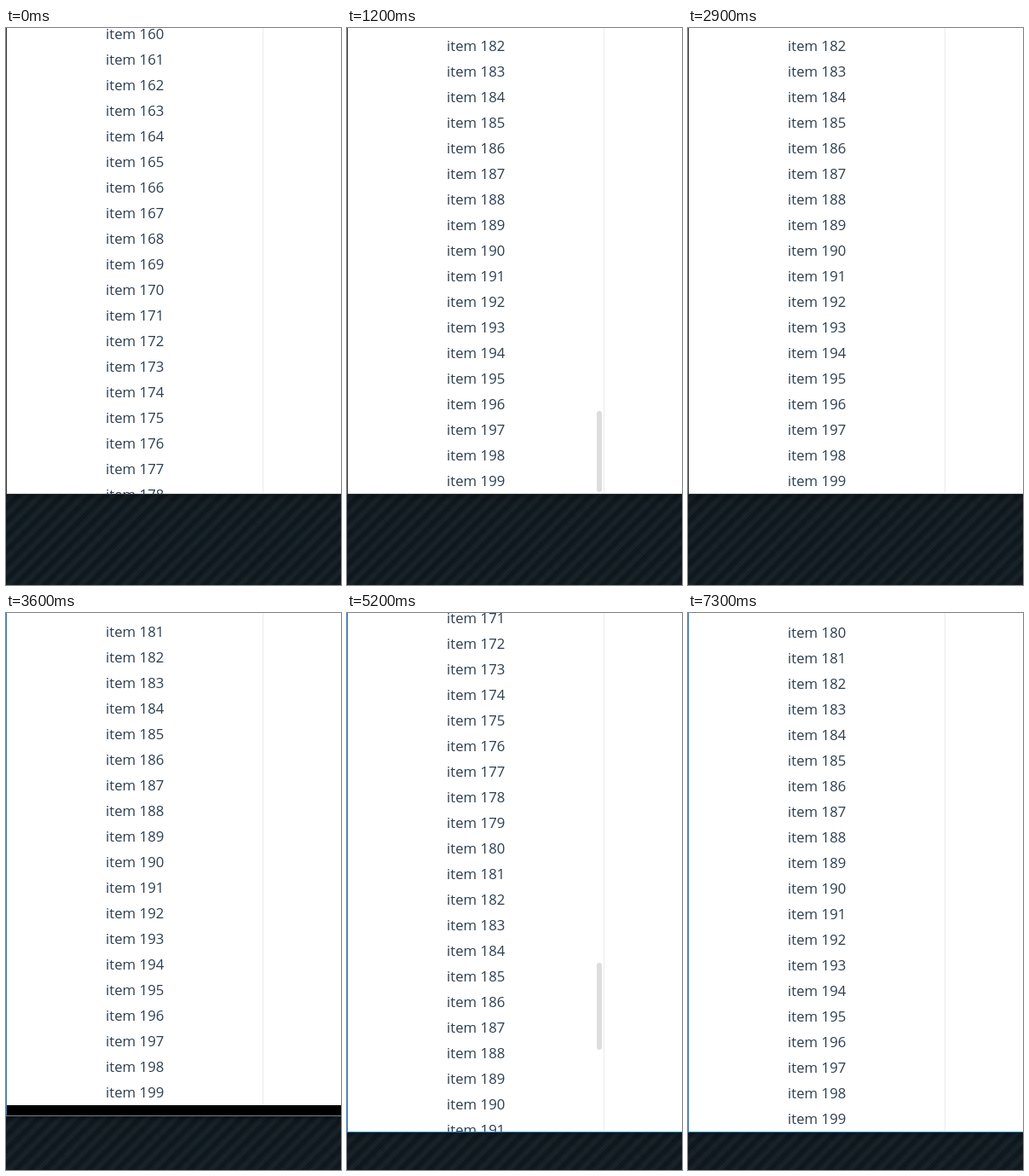
An HTML page for the animation above (8 s loop, 393x653 px).

```html
<!DOCTYPE html>
<html lang="en">
<head>
<meta charset="utf-8">
<title>Scrolling list</title>
<style>
html, body { margin: 0; width: 100%; height: 100%; overflow: hidden; }
body {
  position: relative;
  background:
    repeating-linear-gradient(45deg, #0002 0 1px, #0000 1px 3px),
    repeating-linear-gradient(135deg, #10191f 0 3px, #19242b 7px 9px, #10191f 12px);
}
div { position: absolute; box-sizing: border-box; }
#win {
  left: 0; top: 0; width: 393px;
  border: solid; border-width: 0 0 1px 1px;
  background: #000; box-shadow: 0 2px 8px #0006;
}
#page { left: 0; top: 0; width: 392px; overflow: hidden; background: #fff; }
#rule { left: 300px; top: 0; width: 1px; height: 100%; background: #ebebeb; }
#list {
  left: 116px; bottom: 0; white-space: pre;
  font: 16.8px/30px "Open Sans", "Noto Sans", sans-serif; color: #2c3e50;
}
#thumb { left: 292px; width: 6px; border-radius: 3px; }
</style>
</head>
<body>
<div id="win">
  <div id="page">
    <div id="list"></div>
    <div id="rule"></div>
    <div id="thumb"></div>
  </div>
</div>
<script>
const [win, page, list, thumb] =
  ["win", "page", "list", "thumb"].map(id => document.getElementById(id));
const LOOP = 8000, STEP = 100, HEIGHT = 546, GROWTH = 62;

list.textContent = Array.from({ length: 60 }, (_, i) => "item " + (140 + i)).join("\n");

const ramp = (t, a, b) => Math.min(1, Math.max(0, (t - a) / (b - a)));
const ease = (t, a, b) => { const u = ramp(t, a, b); return u * u * (3 - 2 * u); };
const hump = (t, a, peak, b) => ease(t, a, peak) - ease(t, peak, b);
const grow = t => Math.round(GROWTH * (1 - (1 - ramp(t, 3300, 3900)) ** 1.7));
const within = (t, a, b) => t >= a && t < b;

function thumbColor(t) {
  if (within(t, 400, 2900) || within(t, 5000, 6500)) return "#ddd";
  if (within(t, 4400, 5000) || within(t, 7200, 7300)) return "#e8e8e8";
  return "transparent";
}

function draw(now) {
  const t = Math.floor(now % LOOP / STEP) * STEP;

  // Distance of the view from the end of the list
  const scroll = Math.round(646 * (1 - ease(t, 600, 1200))
    + 400 * hump(t, 1600, 2000, 2300)
    + 300 * hump(t, 4900, 5300, 5600));

  // The page repaints one step behind the window edge
  const outer = grow(t), inner = grow(t - STEP);
  win.style.height = HEIGHT + outer + 1 + "px";
  page.style.height = HEIGHT + inner + "px";
  const edge = t < 3200 ? "#333" : "#1883d7";
  win.style.borderLeftColor = edge;
  win.style.borderBottomColor = outer > inner ? "#75807f" : edge;

  list.style.transform = `translateY(${scroll}px)`;
  const tall = t >= 4000;
  thumb.style.top = (tall ? 442 : 449) - Math.round(scroll / 8) + "px";
  thumb.style.height = (tall ? 102 : 95) + "px";
  thumb.style.background = thumbColor(t);
}

function frame() {
  draw(performance.now());
  requestAnimationFrame(frame);
}
frame();
</script>
</body>
</html>
```
